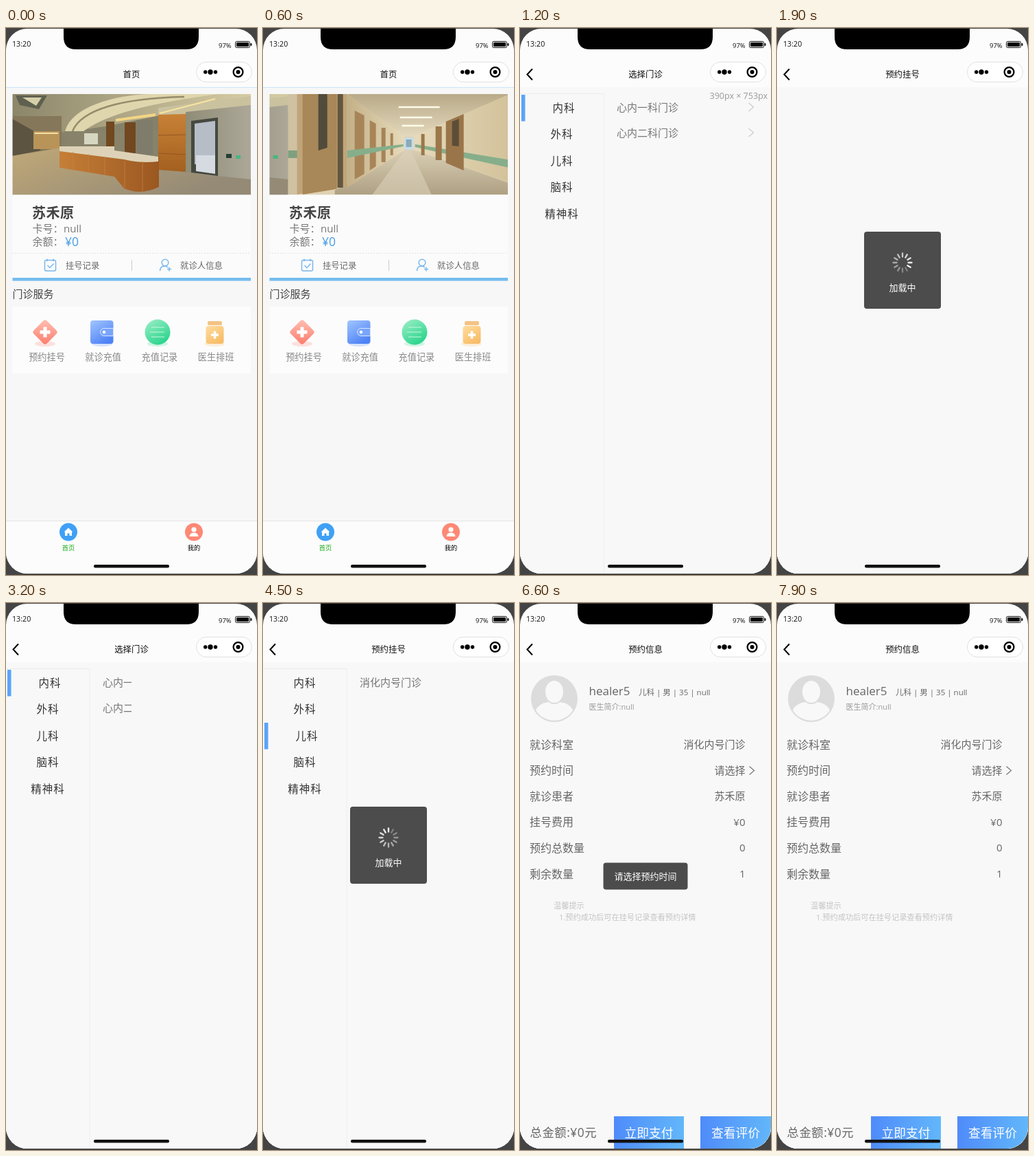
Recreate the animation shown at these times as an HTML page. Size 366 by 795 pixels, loop 8000 ms.

```html
<!DOCTYPE html>
<html lang="zh-CN">
<head>
<meta charset="utf-8">
<title>门诊预约</title>
<style>
  html, body { margin: 0; width: 100%; height: 100%; overflow: hidden; background: #444; }
  svg { display: block; width: 100%; height: 100%; font-family: "Open Sans", "Noto Sans CJK SC", "Noto Sans CJK", sans-serif; }
</style>
</head>
<body>
<svg id="stage" viewBox="0 0 366 795"></svg>
<script>
const LOOP = 8000, STEP = 100, WIDTH = 366;
const PATIENT = '苏禾原', DOCTOR = 'healer5';
const stage = document.getElementById('stage');

const rect = (x, y, w, h, fill, r = 0, more = '') =>
  `<rect x="${x}" y="${y}" width="${w}" height="${h}" rx="${r}" fill="${fill}" ${more}/>`;
const circle = (x, y, r, fill, more = '') => `<circle cx="${x}" cy="${y}" r="${r}" fill="${fill}" ${more}/>`;
const shape = (d, fill, more = '') => `<path d="${d}" fill="${fill}" ${more}/>`;
const line = (d, color, w = 1, more = '') =>
  `<path d="${d}" fill="none" stroke="${color}" stroke-width="${w}" ${more}/>`;
const text = (x, y, size, str, fill = '#666', anchor = 'start', more = '') =>
  `<text x="${x}" y="${y}" font-size="${size}" fill="${fill}" text-anchor="${anchor}" ${more}>${str}</text>`;
const at = (x, y, body) => `<g transform="translate(${x} ${y})">${body}</g>`;
const chevron = (x, y, color) => line(`M${x} ${y - 6}l7 6l-7 6`, color, 1.2);
const gradient = (id, from, to, x2, y2) =>
  `<linearGradient id="${id}" x2="${x2}" y2="${y2}"><stop stop-color="${from}"/><stop offset="1" stop-color="${to}"/></linearGradient>`;

// Progress of a slide that began at `start`
function slide(time, start) {
  const u = Math.min(1, Math.max(0, (time - start) / 208));
  return u * u * (3 - 2 * u);
}

const defs = `<defs>
  <clipPath id="phone"><rect y="1" width="366" height="792" rx="31"/></clipPath>
  <clipPath id="banner"><rect x="9.5" y="96" width="347.5" height="146.5"/></clipPath>
  <filter id="soft"><feGaussianBlur stdDeviation=".7"/></filter>
  ${gradient('button', '#4f8bfa', '#62b7fa', 1, 0)}
  ${gradient('red', '#ffc0b4', '#fb7b6b', 1, 1)}
  ${gradient('blue', '#a3c6ff', '#4f83f5', 0.6, 1)}
  ${gradient('green', '#a0efc8', '#2bd58d', 0.6, 1)}
  ${gradient('gold', '#ffdc9f', '#f8bd68', 0.6, 1)}
  ${gradient('floor', '#c0a878', '#948a76', 1, 0.5)}
  ${gradient('ceiling', '#8c866a', '#d6cca4', 1, 0)}
  ${gradient('desk', '#c67f38', '#9a5720', 1, 0)}
  ${gradient('pillar', '#c98237', '#a3601f', 0, 1)}
  ${gradient('greyWall', '#8f8c76', '#aca798', 1, 0)}
  ${gradient('hallFloor', '#d9ceb4', '#aea083', 0, 1)}
  ${gradient('hallLeft', '#c3b088', '#e6dab9', 1, 0)}
  ${gradient('hallRight', '#e6dabb', '#cfbd94', 1, 0)}
  ${gradient('hallCeiling', '#b9aa88', '#e4d9bd', 0, 1)}
</defs>`;

const reception =
  rect(9, 96, 349, 147, '#858069') +
  shape('M9 96H357V112L250 122L150 142L85 152L9 126Z', 'url(#ceiling)') +
  shape('M86 152C92 118 150 98 210 96H310C220 108 150 122 110 152Z', '#dfd6ad') +
  line('M97 150C110 118 170 102 260 100', '#948c6b', 2.5) +
  shape('M14 98H60L48 118L20 112Z', '#5f604f') + shape('M24 101H52L44 113Z', '#d5cfa9') +
  rect(9, 128, 72, 54, '#85775a') + shape('M9 132L50 155V178L9 186Z', '#5c5441') +
  rect(40, 150, 38, 26, '#b99459') + line('M42 153H76', '#f2dfa5', 2) +
  rect(85, 150, 138, 36, '#878269') + rect(114, 153, 20, 16, '#d7d6c1') +
  rect(146, 136, 12, 40, '#714820') + rect(173, 137, 16, 45, '#714820') + rect(190, 134, 24, 52, '#807c6b') +
  shape('M160 132L218 124V128L160 136Z', '#f4d584') +
  shape('M9 186L80 174V200L170 215L223 206L357 216V242H9Z', 'url(#floor)') +
  shape('M222 126L262 122V209L222 206Z', 'url(#pillar)') + line('M222 156L262 155M222 182L262 184', '#935522') +
  shape('M222 116L357 99V122L222 126Z', '#cac29f') + line('M224 124L305 103', '#fae5a0', 2) +
  shape('M262 122L357 112V220L262 210Z', 'url(#greyWall)') +
  shape('M270 135L309 130V215L270 210Z', '#454940') + shape('M275 139L305 135V201L275 198Z', '#b6bdc7') +
  shape('M277 185H305V212L277 208Z', '#d6dbe1') +
  rect(321, 183, 8, 6, '#263f34') + rect(335, 185, 7, 5, '#49b681') +
  shape('M78 174L165 187H223V231Q196 244 172 233L158 216L78 203Z', 'url(#desk)') +
  shape('M78 172L158 172V178L222 187V194Q196 197 172 191L78 179Z', '#ddd2b7') +
  line('M98 180V205M120 183V209M144 187V213M173 193V232M199 194V237', '#c88547', 0.7);

const corridor = at(-28, 0,
  rect(37, 96, 350, 147, '#dfd1b2') +
  shape('M123 96H370L222 158H204Z', 'url(#hallCeiling)') +
  line('M198 115H258M200 130H247M203 142H235', '#fffbe9', 2.5) +
  shape('M205 177H221L387 235V242H105V236Z', 'url(#hallFloor)') +
  shape('M207 178H216L246 242H160Z', '#ddd3bb', 'opacity=".6"') +
  shape('M123 96L206 156V178L123 232Z', 'url(#hallLeft)') +
  shape('M220 157L387 84V234L220 177Z', 'url(#hallRight)') +
  rect(37, 96, 16, 146, '#cfc1a2') + rect(37, 178, 16, 11, '#7da17f') +
  shape('M50 96H123V230L50 242Z', '#c0a57a') + shape('M58 96H108V234L58 242Z', '#a88758') +
  shape('M81 96H94V174L81 178Z', '#514b3c') + rect(109, 96, 8, 136, '#635640') +
  shape('M134 120L148 127V212L134 220Z', '#a88558') + shape('M156 134L165 139V201L156 207Z', '#a88558') +
  rect(173, 145, 6, 50, '#a68459') + rect(186, 153, 4, 32, '#a68459') +
  shape('M123 178L205 169V172L123 189Z', '#86ae8a') +
  rect(206, 159, 14, 18, '#c8dce4') + rect(209, 162, 8, 11, '#8ba9b7') +
  shape('M222 169L387 196V209L222 173Z', '#86ae8a') +
  rect(231, 154, 5, 31, '#9b774b') + rect(252, 143, 9, 49, '#9b774b') +
  shape('M267 136L293 125V207L267 196Z', '#9a754a') + shape('M276 136L286 132V172L276 171Z', '#5b4e39'));

function services() {
  const shadow = (x, color) => `<ellipse cx="${x}" cy="459" rx="15" ry="4" fill="${color}" opacity=".2" filter="url(#soft)"/>`;
  const icons =
    shadow(57, '#fb7566') + rect(43.5, 428.5, 27, 27, 'url(#red)', 4, 'transform="rotate(45 57 442)"') +
    line('M57 434.5V449.5M49.5 442H64.5', '#fff', 5) +
    shadow(140, '#4f83f5') + rect(123, 425, 33.5, 34, 'url(#blue)', 4) +
    shape('M156.5 436.5H143a5.5 5.5 0 0 0 0 11H156.5Z', '#79a6fb', 'stroke="#d5e4ff"') + circle(143, 442, 2.3, '#fff') +
    shadow(221, '#27d68d') + circle(221, 442, 18.5, 'url(#green)') +
    line('M212 435H231M210 442H231M212 449H231', '#c9f6e1', 1) +
    shadow(304, '#f9b95c') + rect(294, 426, 21, 6, '#f3c384', 2) + rect(291.5, 433, 26, 26, 'url(#gold)', 4) +
    line('M304.5 440.5V451.5M299 446H310', '#fff', 3.5);
  const labels = ['预约挂号', '就诊充值', '充值记录', '医生排班'];
  return icons + labels.map((s, i) => text(59.5 + 82.2 * i, 482.7, 13.2, s, '#888', 'middle')).join('');
}

function home(time) {
  const shift = -348 * slide(time, 428);
  return rect(0, 86, WIDTH, 710, '#f7f7f7') + rect(0, 86, WIDTH, 1, '#cde5fa') +
    `<g clip-path="url(#banner)"><g filter="url(#soft)">${at(shift, 0, reception + at(348, 0, corridor))}</g></g>` +
    rect(9.5, 242.5, 347.5, 121, '#fbfbfb') +
    text(38, 276, 20, PATIENT, '#444', 'start', 'font-weight="700" letter-spacing=".5"') +
    text(38.5, 296.5, 15, '卡号：', '#777') + text(84, 296.5, 15, 'null', '#777') +
    text(38.5, 316, 15, '余额：', '#777') + text(86, 316.5, 17.5, '¥0', '#4a9de6') +
    line('M9 327.5H357', '#e2e2e2', 1, 'stroke-dasharray="2 2"') +
    rect(56.5, 337.5, 16, 15.5, 'none', 2, 'stroke="#78b7ee" stroke-width="1.5"') +
    line('M60 335.5V339M69 335.5V339M60.5 345L64 348.5L69.5 342.5', '#78b7ee', 1.5) +
    text(87, 349.5, 12.3, '挂号记录') + rect(183, 337, 1, 16, '#ccc') +
    circle(232, 341, 4.8, 'none', 'stroke="#78b7ee" stroke-width="1.5"') +
    line('M224.5 353Q225 346 231 346Q234 346 236 348M238 347.5V353.5M235 350.5H241', '#78b7ee', 1.5) +
    text(254, 349.5, 12.4, '就诊人信息') +
    rect(9.5, 363, 347.5, 4.5, '#74bcef') +
    text(9.5, 392, 15, '门诊服务', '#444') +
    rect(9.5, 405, 347.5, 97, '#fcfcfc') + services() +
    rect(0, 716, WIDTH, 80, '#fcfcfc') + rect(0, 716, WIDTH, 1, '#e6e6e6') +
    circle(91, 732.5, 13, '#3fa0f5') + shape('M84.5 732.5L91 726.5L97.5 732.5H96V738H92.5V734.5H89.5V738H86V732.5Z', '#fff') +
    circle(274, 732.5, 13, '#fd8975') + circle(274, 729, 3.6, '#fff') + shape('M267.5 739Q268 733.5 274 733.5T280.5 739Z', '#fff') +
    text(91, 758.5, 9.3, '首页', '#1aad19', 'middle', 'font-weight="500"') +
    text(274, 758.5, 9.3, '我的', '#000', 'middle', 'font-weight="500"');
}

const page = body => rect(0, 86, WIDTH, 710, '#f8f8f8') + body;

function departments(time) {
  const selected = time < 3900 ? 0 : 2;
  const clinics = selected ? ['消化内号门诊'] : ['心内一科门诊', '心内二科门诊'];
  return page(
    rect(0, 95, 122, 1, '#ececec') + rect(121.5, 95, 1, 700, '#ededed') +
    rect(2, 97 + 38.5 * selected, 5.5, 38.5, '#5aa4fa') +
    ['内科', '外科', '儿科', '脑科', '精神科'].map((s, i) =>
      text(61 + (i === selected) * 3, 121.5 + 38.5 * i, 15.5, s, '#333', 'middle', 'letter-spacing="1"')).join('') +
    clinics.map((s, i) => text(141, 120.5 + 37 * i, 15, s, '#777') + chevron(333.5, 115 + 37 * i, '#ccc')).join('') +
    (time >= 1100 && time < 1600 ? text(361, 103, 12.5, '390px × 753px', '#999', 'end') : ''));
}

const avatar = (x, y) => at(x, y,
  circle(0, 0, 34, '#dcdcdc') +
  shape('M-27 17Q-23 7 -9 5H9Q23 7 27 17A32 32 0 0 1 -27 17Z', '#f8f8f8') +
  '<ellipse cy="-10" rx="14" ry="17" fill="#f8f8f8" stroke="#dcdcdc" stroke-width="2"/>');

const doctors = time => page(time < 4900 ? '' :
  circle(55, 162, 36.5, 'none', 'stroke="#e2e2e2"') + avatar(55, 161) +
  text(105, 156, 17, DOCTOR) + text(105, 177, 11, '医生简介:null', '#999'));

function info(time) {
  const ready = time >= 6000, none = 'undefined';
  const rows = [
    ['就诊科室', ready ? '消化内号门诊' : none],
    ['预约时间', '请选择'],
    ['就诊患者', ready ? PATIENT : ''],
    ['挂号费用', ready ? '¥0' : '¥' + none],
    ['预约总数量', ready ? '0' : none],
    ['剩余数量', ready ? '1' : none]];
  const button = (x, w, center, label) =>
    rect(x, 746, w, 47, 'url(#button)') + text(center, 776.5, 17.7, label, '#fff', 'middle');
  const total = (y, str) => text(14.5, y, 17.3, str, '#666', 'start', 'letter-spacing=".6"');
  const profile = ready
    ? avatar(50, 139) + text(100.5, 133.5, 17, DOCTOR) + text(173, 133.5, 11.5, '儿科 | 男 | 35 | null')
    : text(110, 133.5, 11.5, `${none} | 女 | ${none} | ${none}`);
  const footer = ready
    ? total(776, '总金额:¥0元') + button(137, 102, 188, '立即支付') + button(263, 103, 314.5, '查看评价')
    : total(765.5, '总金额:¥' + none) + total(788, '元') +
      button(178, 94, 224.5, '立即支付') + button(272, 94, 318.5, '查看评价');
  return page(profile +
    text(100.5, 155, 11, '医生简介:' + (ready ? 'null' : none), '#999') +
    rows.map(([label, value], i) =>
      text(14, 211.5 + 37.6 * i, 16, label) + text(328.5, 211 + 37.6 * i, 15, value, '#666', 'end')).join('') +
    chevron(334.5, 243.5, '#777') +
    text(49, 443.5, 11.2, '温馨提示', '#c4c4c4', 'start', 'font-weight="500"') +
    text(57, 460.5, 11.2, '1.预约成功后可在挂号记录查看预约详情', '#c4c4c4', 'start', 'font-weight="500"') +
    footer);
}

function loading(time) {
  let spokes = '';
  for (let i = 0; i < 12; i++) {
    const angle = 30 * (Math.floor((time - 4500) / 83) - i);
    spokes += line('M0 -8.5V-13.5', '#fff', 2.3, `stroke-linecap="round" opacity="${0.95 - 0.06 * i}" transform="rotate(${angle})"`);
  }
  return rect(127, 296, 112, 112, '#4c4c4c', 4) + at(183, 341, spokes) +
    text(183, 382, 13, '加载中', '#fff', 'middle');
}

const notice = () => rect(121.5, 377.5, 123, 39, '#4c4c4c', 4) +
  text(183, 401.5, 13, '请选择预约时间', '#fff', 'middle');

function chrome(title, canGoBack) {
  return rect(0, 0, WIDTH, 86, '#fcfcfc') +
    text(9, 27, 10.7, '13:20', '#111') + text(310, 29, 9.5, '97%', '#111') +
    rect(334.5, 19.5, 21, 9, 'none', 2, 'stroke="#111"') + rect(336, 21, 18, 6, '#000', 1) + rect(356.5, 22, 2, 4, '#111', 1) +
    shape('M84 0H281V13Q281 31 263 31H102Q84 31 84 13Z', '#000') +
    (canGoBack ? line('M18 59.5L10.5 67.5L18 75.5', '#000', 2) : '') +
    text(183, 71.7, 12.4, title, '#111', 'middle') +
    rect(277.5, 49.5, 81, 29, '#fff', 14.5, 'stroke="#e0e0e0"') +
    circle(290.7, 64, 2.7, '#000') + circle(298, 64, 3.7, '#000') + circle(305.5, 64, 2.7, '#000') +
    circle(338.5, 64, 6.9, 'none', 'stroke="#000" stroke-width="2.3"') + circle(338.5, 64, 3, '#000');
}

function titleAt(time) {
  if (time < 800) return '首页';
  if (time >= 5800) return '预约信息';
  const listOpen = (time >= 1600 && time < 3200) || time >= 4400;
  return listOpen ? '预约挂号' : '选择门诊';
}

function render(time) {
  const during = (from, to) => time >= from && time < to;
  const entering = start => WIDTH * (1 - slide(time, start));
  const doctorsX = time < 3000 ? entering(1646) : time < 4400 ? WIDTH * slide(time, 3096) : entering(4446);
  const layers = [[0, home], [entering(846), departments], [doctorsX, doctors], [entering(5746), info]];
  const pages = layers.filter(([x]) => x < WIDTH).map(([x, draw]) => at(x, 0, draw(time))).join('');
  const busy = during(800, 1200) || during(1600, 2000) || during(4400, 4900);
  stage.innerHTML = defs + rect(0, 0, WIDTH, 795, '#444') +
    `<g clip-path="url(#phone)">${pages}${chrome(titleAt(time), time >= 800)}` +
    (busy ? loading(time) : '') + (during(6600, 7900) ? notice() : '') +
    rect(128, 780, 110, 4.5, '#111', 2) + '</g>';
}

const began = performance.now();
let shown = -1;
function tick() {
  const time = Math.floor(((performance.now() - began) % LOOP) / STEP) * STEP;
  if (time !== shown) render(shown = time);
  requestAnimationFrame(tick);
}
tick();
</script>
</body>
</html>
```
